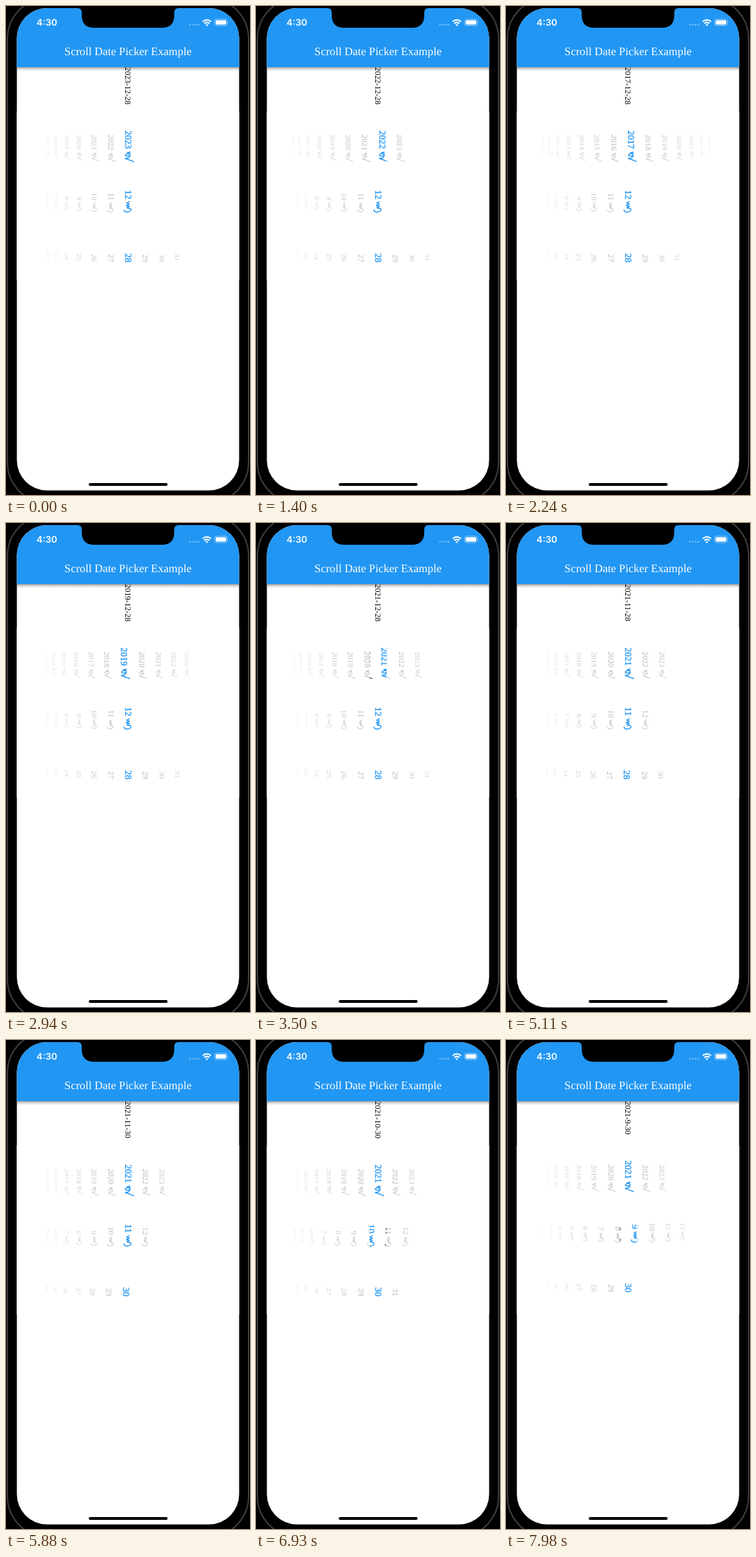
Recreate the animation shown at these times as an HTML page. Size 348 px wide and 696 px high, loop 8000 ms.

```html
<!DOCTYPE html>
<html lang="en">
<head>
<meta charset="utf-8">
<title>Scroll Date Picker Example</title>
<style>
html, body { margin: 0; height: 100%; overflow: hidden; background: #000; }
svg { display: block; width: 100vw; height: 100vh; }
text { font-family: "Liberation Serif", "Times New Roman", serif; white-space: pre; text-rendering: geometricPrecision; }
.clock { font: 600 13px Inter, Roboto, sans-serif; }
.word { fill: none; stroke: #000; stroke-width: 1; stroke-linejoin: round; stroke-linecap: round; }
.on text { fill: #2196f3; stroke: #2196f3; stroke-width: .35; }
.on .word { stroke: #2196f3; stroke-width: 1.4; }
</style>
</head>
<body>
<svg viewBox="0 0 348 696">
  <defs>
    <linearGradient id="fade">
      <stop offset="0" stop-color="#fff"/>
      <stop offset="1" stop-color="#fff" stop-opacity=".7"/>
    </linearGradient>
    <linearGradient id="shade" x2="0" y2="1">
      <stop offset="0" stop-opacity=".38"/>
      <stop offset=".45" stop-opacity=".14"/>
      <stop offset="1" stop-opacity="0"/>
    </linearGradient>
    <clipPath id="screen"><rect x="15.5" y="3" width="317" height="686.5" rx="43"/></clipPath>
  </defs>

  <rect x="2" y="-12" width="344" height="720" rx="59" stroke="#3d3d3d" stroke-width="2"/>
  <g clip-path="url(#screen)">
    <rect width="348" height="696" fill="#fff"/>
    <text id="date" font-size="11.4" transform="matrix(0 1 -1 0 174 87)" y="3.8"></text>
    <g id="wheels"></g>
    <rect x="15" y="150" width="147" height="240" fill="url(#fade)"/>
    <rect x="15" y="150" width="147" height="240" fill="url(#fade)" transform="matrix(-1 0 0 1 348 0)"/>
    <rect y="87" width="348" height="6" fill="url(#shade)"/>
    <rect width="348" height="87" fill="#2196f3"/>
    <path d="M102 3q6 0 6 6v4q0 18 18 18h96q18 0 18-18v-4q0-6 6-6z"/>
    <rect x="118" y="679" width="112.500" height="4" rx="2"/>
  </g>

  <g fill="#fff">
    <text x="174" y="69.500" font-size="16.3" text-anchor="middle">Scroll Date Picker Example</text>
    <text class="clock" x="43.500" y="28.300" style="font-family:Inter,Roboto,sans-serif">4:30</text>
    <g opacity=".4">
      <circle cx="262.500" cy="26.800" r="1.200"/><circle cx="266.500" cy="26.800" r="1.200"/>
      <circle cx="270.500" cy="26.800" r="1.200"/><circle cx="274.500" cy="26.800" r="1.200"/>
    </g>
    <g fill="none" stroke="#fff" stroke-width="2">
      <path d="M280.500 22.200q6-5 12 0M282.800 24.900q3.700-3 7.400 0"/>
    </g>
    <path d="M284.500 26.700q2-1.500 4 0l-2 2z"/>
    <rect x="297.500" y="18.700" width="18" height="9.300" rx="2.700" fill="none" stroke="#fff" stroke-opacity=".45"/>
    <rect x="299" y="20.200" width="15" height="6.300" rx="1.400"/>
    <path d="M316.600 21.900q1.800 1.400 0 2.900z" opacity=".5"/>
  </g>
</svg>
<script>
const LOOP = 8000, TICK = 70;
const STEP = 0.05228, RADIUS = 477, DEPTH = 0.01226; // cylinder: angle per row, radius, perspective
const MID = 174, END = 32, BIG = 13.04, SMALL = 11.41;

// Mongolian words for "year" and "month", drawn for the big size, ending at x = 0
const YEAR = 'M-14-3L-13 1L-11.500-3C-13 3-9 6-8.500 2C-8 0-9-2-10-3C-7-3-5-1-5 4C-4 1-2-4-.5-8';
const MONTH = 'M-15-2L-13 2L-11.500-2L-9.500 2.500L-8.500-2L-6.500 1.500L-5.500-3M-5-4C-2-5 0-2-.5 2C-1 5-2.500 6-3.500 5.500';

// Scroll position of each wheel: [ms, row]
const paths = {
  year: [[770, 2023], [1120, 2022.6], [1400, 2021.76], [1610, 2020.5], [1960, 2018.1], [2240, 2016.82],
    [2380, 2016.72], [2450, 2016.72], [2660, 2017.5], [2940, 2019.22], [3290, 2020.4], [3710, 2020.75],
    [4130, 2020.92], [4480, 2021]],
  month: [[3500, 12], [3850, 11.7], [4130, 11.26], [4480, 11], [6510, 11], [6930, 10.4], [7350, 10],
    [7630, 10], [7840, 9.3], [7980, 8.58], [8050, 8.3]],
  day: [[5040, 28], [5460, 29.2], [5740, 30.15], [5880, 30.1], [6160, 30]]
};

// Smooth curve through the points, flat at ends, rests and turning points
function follow(pts, t) {
  const last = pts.length - 1;
  if (t <= pts[0][0]) return pts[0][1];
  if (t >= pts[last][0]) return pts[last][1];
  const slope = i => (pts[i + 1][1] - pts[i][1]) / (pts[i + 1][0] - pts[i][0]);
  const tangent = i => {
    if (i === 0 || i === last) return 0;
    const a = slope(i - 1), b = slope(i);
    return a * b > 0 ? 2 * a * b / (a + b) : 0;
  };
  const i = pts.findIndex(p => p[0] > t) - 1;
  const [t0, v0] = pts[i], [t1, v1] = pts[i + 1];
  const d = t1 - t0, u = (t - t0) / d, s = u * u * (3 - 2 * u);
  return v0 + (v1 - v0) * s + d * u * (1 - u) * ((1 - u) * tangent(i) - u * tangent(i + 1));
}

function row(n, offset, y, word, on) {
  const a = offset * STEP, sin = Math.sin(a), cos = Math.cos(a);
  const w = 1 + DEPTH * RADIUS * (1 - cos);
  const squash = (cos - DEPTH * RADIUS * sin * sin / w) / w;
  const slant = 20 * DEPTH * sin / (w * w);
  const size = on ? BIG : SMALL;
  const x = END - size * (String(n).length / 2 + (word ? 1.43 : 0));
  const matrix = [0, 1 / w, -squash, slant, MID + RADIUS * sin / w, y].map(v => v.toFixed(4));
  const mark = word ? `<path class="word" d="${word}" transform="translate(${END}) scale(${size / BIG})"/>` : '';
  return `<g class="${on ? 'on' : ''}" transform="matrix(${matrix})">` +
    `<text x="${x}" y="${size * 0.33}" font-size="${size}">${n}</text>${mark}</g>`;
}

function wheel(pos, pick, min, max, y, word) {
  let out = '';
  for (let n = Math.max(min, Math.ceil(pos - 6.95)); n <= Math.min(max, pos + 6.95); n++)
    out += row(n, n - pos, y, word, n === pick);
  return out;
}

const dateText = document.getElementById('date'), wheels = document.getElementById('wheels');

function draw(now) {
  let t = now % LOOP;
  t -= t % TICK;
  const year = follow(paths.year, t), month = follow(paths.month, t), day = follow(paths.day, t);
  const y = Math.round(year), m = Math.round(month), d = Math.round(day);
  const days = new Date(y, m, 0).getDate();
  const date = `${y}-${m}-${d}`;
  const top = 190 + (date.length - 10) * 5.7; // the wheels sit below the date line
  dateText.textContent = date;
  wheels.innerHTML = wheel(year, y, 1900, 2023, top, YEAR) +
    wheel(month, m, 1, 12, top + 71.7, MONTH) +
    wheel(day, d, 1, days, top + 143, '');
  requestAnimationFrame(draw);
}
requestAnimationFrame(draw);
</script>
</body>
</html>
```
